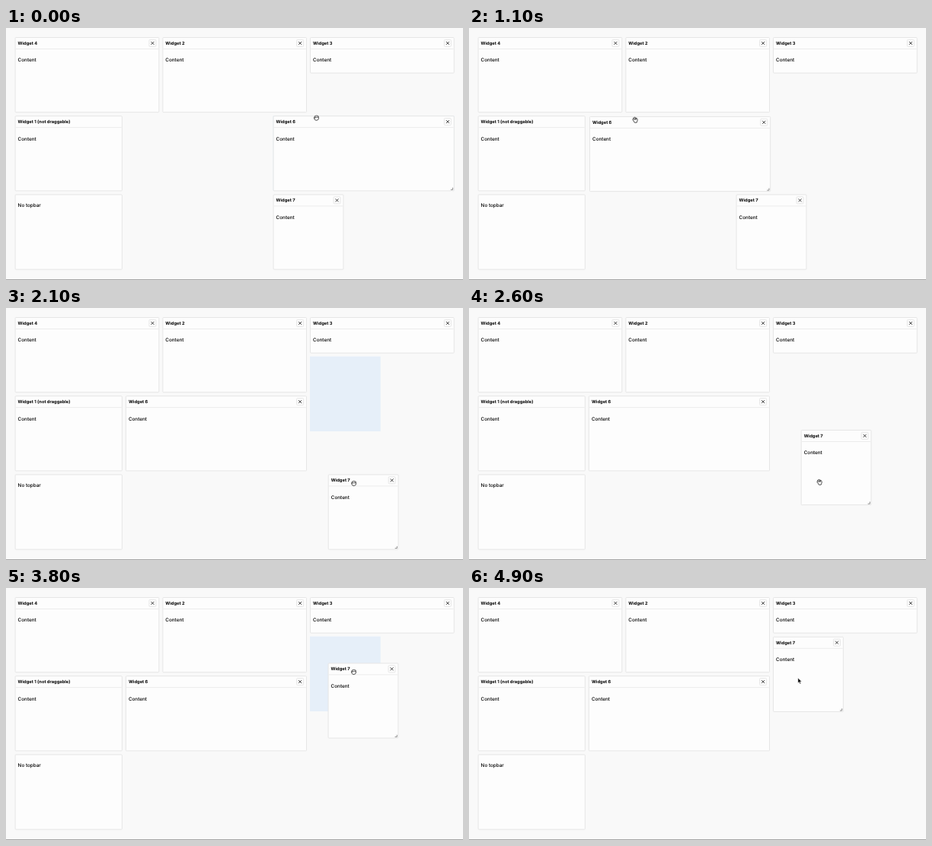
Animation of 600 by 331 pixels, one loop 5000 ms. Source, as an HTML page:

```html
<!DOCTYPE html>
<html lang="en">
<head>
<meta charset="utf-8">
<title>Widget grid</title>
<style>
  html, body { margin: 0; width: 100%; height: 100%; overflow: hidden; background: #f9f9f9; }
  svg { display: block; width: 600px; height: 331px; }
  text { font: 500 6.35px Inter, sans-serif; fill: #000; text-rendering: geometricPrecision; }
  .title { font-size: 5.74px; font-weight: 700; }
  .box { fill: #fdfdfd; stroke: #e6e6e6; }
  .rule { stroke: #ececec; }
  .close { fill: #fdfdfd; stroke: #dedede; stroke-width: .7; }
  .cross { stroke: #222; stroke-width: .85; }
  .handle { fill: none; stroke: #777; stroke-width: .8; }
  .hand { fill: #fff; stroke: #222; stroke-width: .8; stroke-linejoin: round; }
  .arrow { fill: #000; stroke: #fff; stroke-width: .5; }
</style>
</head>
<body>
<svg id="stage" viewBox="0 0 600 331"></svg>
<script>
const stage = document.getElementById('stage');
const LOOP = 5000, STEP = 100;
const LEFT = 11.6, TOP = 12, COL = 48.43, ROW = 51.6, GAP = 4.2, BAR = 16;
const cell = (col, row) => [LEFT + col * COL, TOP + row * ROW];

function add(parent, tag, attrs, text) {
  const el = document.createElementNS('http://www.w3.org/2000/svg', tag);
  for (const name in attrs) el.setAttribute(name, attrs[name]);
  if (text) el.textContent = text;
  return parent.appendChild(el);
}
const show = (el, on) => el.setAttribute('visibility', on ? 'visible' : 'hidden');
const move = (el, [x, y]) => el.setAttribute('transform', `translate(${x} ${y})`);

function widget(title, col, row, cols, rows, closable = true) {
  const w = cols * COL - GAP, h = rows * ROW - GAP;
  const el = add(stage, 'g');
  add(el, 'rect', { class: 'box', x: .5, y: .5, width: w - .8, height: h - .8, rx: 1 });
  if (title) {
    add(el, 'path', { class: 'rule', d: `M1 15.5H${w - 1}` });
    add(el, 'text', { class: 'title', x: 4, y: 9.8 }, title);
    if (closable) {
      add(el, 'rect', { class: 'close', x: w - 13.2, y: 3.4, width: 9, height: 9, rx: 1 });
      add(el, 'path', { class: 'cross', d: `M${w - 10.7} 5.9l4 4m0-4l-4 4` });
    }
  }
  add(el, 'text', { x: 4, y: title ? 32.4 : 16.8 }, title ? 'Content' : 'No topbar');
  const handle = add(el, 'path', { class: 'handle', d: `M${w - 2} ${h - 4.5}v2.7h-2.7` });
  show(handle, false);
  move(el, cell(col, row));
  return { el, handle, w, h, home: cell(col, row) };
}

add(stage, 'rect', { y: 330, width: 600, height: 1, fill: '#a6a6a6' });
widget('Widget 4', 0, 0, 4, 2);
widget('Widget 2', 4, 0, 4, 2);
widget('Widget 3', 8, 0, 4, 1);
widget('Widget 1 (not draggable)', 0, 2, 3, 2, false);
widget('', 0, 4, 3, 2);
const slot = add(stage, 'rect', { fill: '#e6eff9' });
const wide = widget('Widget 6', 7, 2, 5, 2);
const small = widget('Widget 7', 7, 4, 2, 2);

const cursor = add(stage, 'g');
const shapes = {
  closed: add(cursor, 'path', { class: 'hand', d: 'M-2.6-1.2q0-1.7 1.6-1.6q1-.6 2 0q1.9-.1 1.9 1.9v1.4q-.3 2.3-2.4 2.5h-1.2q-1.8-.3-2.2-2.2q-.5-1.2.3-2zq.1 1.1.8 1.7M-1-1.6v1.5M.4-1.7v1.6M1.7-1.5v1.4' }),
  open: add(cursor, 'path', { class: 'hand', d: 'M-1.9.9l-1.2-1.3q-.1-1 .9-.6l.4.3l-.7-2q.5-1.1 1.2 0l.1-.6q.8-.8 1.2 0l.2.2q.9-.6 1.2.4q1-.3 1.1.8l.6.5q.4.4.1 1.5l-.5 1.7l-.5 1.4h-2.9zM-.9-2.4l.4 2M.4-2.9l.3 2.4M1.7-2.5v2' }),
  arrow: add(cursor, 'path', { class: 'arrow', d: 'M-1.6-3.8v6.6l1.5-1.3l1.1 2.5l1.2-.5l-1.1-2.4h2.1z' })
};

const linear = k => k;
const smooth = k => k * k * (3 - 2 * k);
const out = k => 1 - (1 - k) ** 2;
const settle = k => smooth(k ** .6);

// Each leg runs from one time to another and ends at a point.
const leg = (from, to, end, ease = smooth) => ({ from, to, end, ease });
wide.legs = [leg(200, 800, [161, 118]), leg(1000, 1200, cell(3, 2), settle)];
small.legs = [
  leg(1600, 2200, [428.5, 218.4]),
  leg(2530, 2830, cell(9, 1), settle),
  leg(3600, 3800, [422.6, 98.4], linear),
  leg(3800, 4300, [390.7, 124.2], out),
  leg(4615, 4915, cell(8, 1), settle)
];
const pointer = {
  home: [218, 121],
  legs: [
    leg(1100, 1600, [384, 230]), leg(2500, 2600, [460, 229]), leg(2900, 3500, [481, 76]),
    leg(4500, 4600, [425, 135]), leg(4600, 4900, [433.5, 122])
  ]
};
const drags = [
  { from: 0, to: 1000, item: wide, grip: [57, 3] },
  { from: 1700, to: 2500, item: small, grip: [34, 12] },
  { from: 3700, to: 4600, item: small, grip: [34, 12] }
];

function positionAt({ home, legs }, t) {
  return legs.reduce((pos, { from, to, end, ease }) => {
    const k = ease(Math.min(1, Math.max(0, (t - from) / (to - from))));
    return pos.map((p, i) => p + (end[i] - p) * k);
  }, home);
}

// The slot snaps to the nearest column and rises to the first free row.
function placeSlot(item) {
  const col = Math.round((item.pos[0] - LEFT) / COL);
  const [x, y] = cell(col, item === wide ? 2 : col < 8 ? 4 : 1);
  const attrs = { x, y, width: item.w, height: item.h - .6 };
  for (const name in attrs) slot.setAttribute(name, attrs[name]);
}

function render(now) {
  const t = Math.floor(now % LOOP / STEP) * STEP;
  for (const item of [wide, small]) item.pos = positionAt(item, t);
  const drag = drags.find(d => t >= d.from && t <= d.to);
  const at = drag ? drag.item.pos.map((p, i) => p + drag.grip[i]) : positionAt(pointer, t);

  show(slot, drag);
  if (drag) placeSlot(drag.item);
  let grabbable = drags.some(d => t === d.to + STEP);
  for (const item of [wide, small]) {
    const [dx, dy] = at.map((p, i) => p - item.pos[i]);
    const hover = dx > 0 && dx < item.w && dy > 0 && dy < item.h;
    grabbable ||= hover && dy < BAR;
    move(item.el, item.pos);
    show(item.handle, hover);
  }
  move(cursor, at);
  const kind = drag ? 'closed' : grabbable ? 'open' : 'arrow';
  for (const name in shapes) show(shapes[name], name === kind);
  requestAnimationFrame(render);
}
render(0);
</script>
</body>
</html>
```
